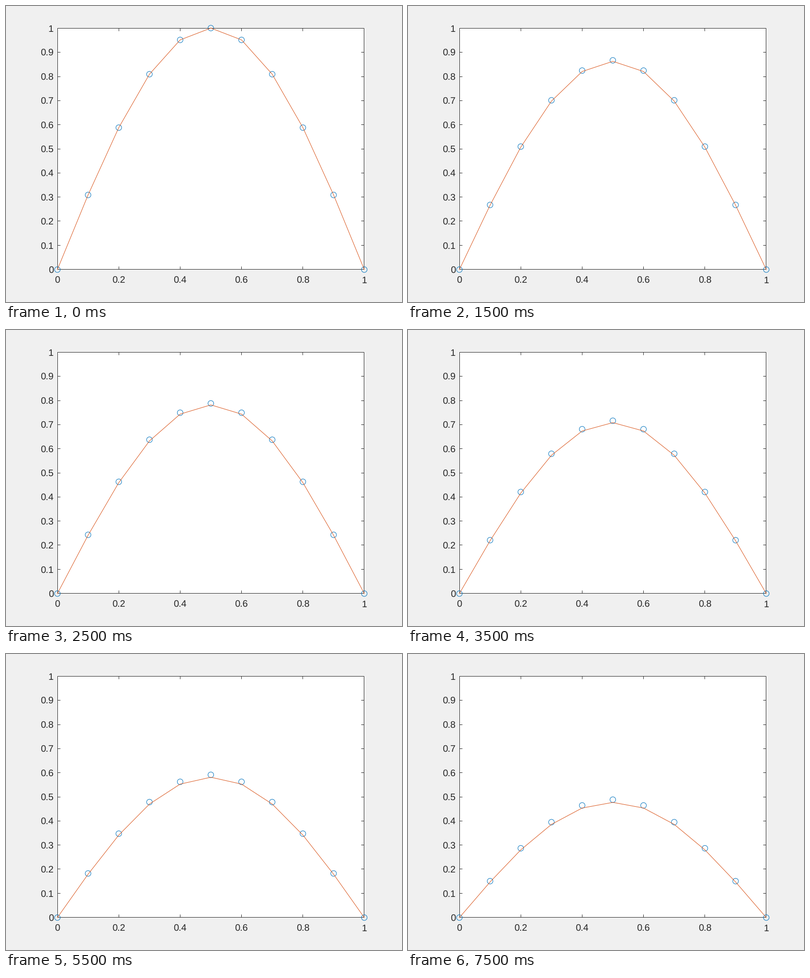
Write a matplotlib script that moves like this. It is 840 by 630 pixels and loops after 8 s.

```python
import numpy as np
import matplotlib.pyplot as plt
from matplotlib.animation import FuncAnimation
from matplotlib.patches import Circle, Rectangle

plt.rcParams["font.family"] = "Liberation Sans"
plt.rcParams["text.hinting"] = "none"

W, H, DPI = 840, 630, 105
PX = 72 / DPI                                   # one pixel in points
LEFT, RIGHT, TOP, BOTTOM = 109, 760, 47, 561    # plot box in pixels
INK, BLUE, ORANGE = "#262626", "#0072BD", "#D95319"
FONT, TICK = 20, 6

# Heat equation u_t = u_xx with u = sin(pi x) at the start
DX, DT, STEPS = 0.1, 0.005, 16
x = np.linspace(0, 1, 11)
shape = np.sin(np.pi * x)
implicit_decay = 1 / (1 + 4 * DT / DX**2 * np.sin(np.pi * DX / 2) ** 2)
exact_decay = np.exp(-np.pi**2 * DT)


def to_px(u):
    return BOTTOM - (BOTTOM - TOP) * u


fig = plt.figure(figsize=(W / DPI, H / DPI), dpi=DPI, facecolor="#F0F0F0")
ax = fig.add_axes([0, 0, 1, 1])
ax.set(xlim=(0, W), ylim=(H, 0))
ax.axis("off")


def stroke(xs, ys):
    ax.plot(xs, ys, color=INK, lw=PX, solid_capstyle="butt", snap=False, zorder=2)


def label(value, left, baseline, align):
    text = f"{value:g}"
    width = FONT * sum(0.278 if c == "." else 0.556 for c in text)
    ax.text(left - align * width, baseline, text, color=INK,
            fontsize=FONT * PX, ha="left", va="baseline")


def draw_axes():
    x0, x1, y0, y1 = LEFT + 0.5, RIGHT - 0.5, TOP + 0.5, BOTTOM - 0.5
    ax.add_patch(Rectangle((x0, y0), x1 - x0, y1 - y0, fc="white", ec=INK,
                           lw=PX, joinstyle="miter", snap=False, zorder=1))
    for i in range(6):
        v = i / 5
        tx = np.floor(x0 + v * (x1 - x0)) + 0.5
        if 0 < i < 5:
            stroke([tx, tx], [y0, y0 + TICK])
            stroke([tx, tx], [y1, y1 - TICK])
        label(v, LEFT + v * (RIGHT - LEFT), 590, 0.5)
    for i in range(11):
        v = i / 10
        ty = np.floor(y1 - v * (y1 - y0)) + 0.5
        if 0 < i < 10:
            stroke([x0, x0 + TICK], [ty, ty])
            stroke([x1, x1 - TICK], [ty, ty])
        label(v, 101, round(to_px(v) + 8), 1)


draw_axes()
px = LEFT + (RIGHT - LEFT) * x
dots = [ax.add_patch(Circle((cx, BOTTOM), 6, fill=False, ec=BLUE, lw=PX, zorder=3))
        for cx in px]
curve, = ax.plot(px, to_px(shape), color=ORANGE, lw=PX,
                 solid_joinstyle="round", snap=False, zorder=4)


def update(step):
    for dot, cx, cy in zip(dots, px, to_px(shape * implicit_decay**step)):
        dot.center = cx, cy
    curve.set_ydata(to_px(shape * exact_decay**step))
    return [*dots, curve]


anim = FuncAnimation(fig, update, frames=STEPS, interval=500, repeat=True,
                     repeat_delay=0, blit=False)
plt.show()
```
